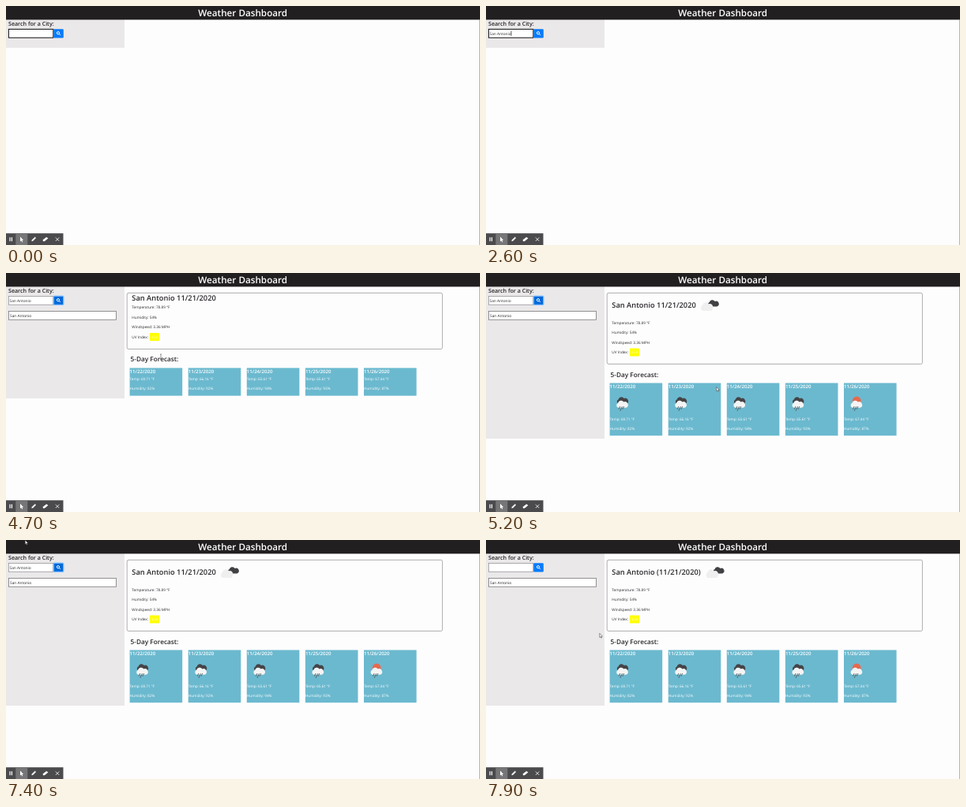
Recreate the animation shown at these times as an HTML page. Size 600x303 px, loop 8 s.

```html
<!DOCTYPE html>
<html lang="en">
<head>
<meta charset="utf-8">
<title>Weather Dashboard</title>
<style>
  html, body { margin: 0; width: 100%; height: 100%; overflow: hidden; background: #fefdfe; }
  svg { display: block; width: 100%; height: 100%; }
  text { font-family: "Open Sans", "Noto Sans", sans-serif; text-rendering: geometricPrecision; white-space: pre; }
  .head { font-weight: 600; }
</style>
</head>
<body>
<svg viewBox="0 0 600 303">
  <defs>
    <path id="cloud" d="M3.4 10A3.3 3.3 0 0 1 3.1 3.9 4.2 4.2 0 0 1 10.6 2.6 3.8 3.8 0 0 1 13.6 10Z"/>
    <g id="broken">
      <use href="#cloud" transform="translate(9.2 0) scale(.92 .88)" fill="#414043"/>
      <use href="#cloud" transform="translate(0 2.6) scale(1.03 1.18)" fill="#f0eff0"/>
    </g>
    <g id="rain">
      <use href="#cloud" transform="translate(0 4) scale(.98 .98)" fill="#f4f4f4"/>
      <g stroke="#55585c" stroke-width=".9" stroke-linecap="round">
        <path d="M5.6 12.4l-1.4 3M8.2 12.6l-2.3 5M10.4 12.4l-1.4 3"/>
      </g>
    </g>
    <path id="arrow" d="M0 0V5.2L1.2 4.2 2 6 2.8 5.6 2 3.9H3.6Z" fill="#fff" stroke="#333" stroke-width=".5"/>
    <path id="hand" d="M-.6 .2Q0-.6 .6 .2V2.2L3 2.8Q3.6 3 3.4 4L2.8 6.4H-.4L-2 3.8Q-1.6 3.2-.6 4Z" fill="#fff" stroke="#333" stroke-width=".5"/>
    <path id="beam" d="M-1 0H1M0 0V6M-1 6H1" fill="none" stroke="#555" stroke-width=".6"/>
  </defs>
  <rect width="600" height="303" fill="#fefdfe"/>
  <rect id="side" y="17" width="150" fill="#eae8e9"/>
  <rect width="600" height="17.4" fill="#221f20"/>
  <text class="head" x="299.7" y="12.6" font-size="11.7" fill="#fff" text-anchor="middle">Weather Dashboard</text>
  <path d="M599.6 17V303" stroke="#8b898a" stroke-width=".7"/>
  <text class="head" x="3" y="24.9" font-size="7.1" fill="#262427">Search for a City:</text>
  <rect id="field" x="3.4" y="29.4" width="56.4" height="10.8" fill="#fff"/>
  <text id="typed" x="4.5" y="36.7" font-size="4.8" fill="#2b2b2b"></text>
  <path id="caret" stroke="#111" stroke-width=".7"/>
  <rect id="button" x="60.2" y="29.2" width="12.6" height="11.2" rx="1.2"/>
  <g fill="none" stroke="#fff" stroke-width="1">
    <circle cx="66" cy="34.2" r="1.6"/><path d="M67.2 35.4l1.7 1.7"/>
  </g>
  <g id="page"></g>
  <g id="toolbar">
    <rect y="288.2" width="72.5" height="14.8" fill="#4b4a4c"/>
    <rect x="12.3" y="288.2" width="15" height="14.8" fill="#767577"/>
    <path d="M5 293.3v5M7.4 293.3v5" stroke="#fff" stroke-width="1.2"/>
    <path d="M18 292.6v6l1.4-1.2 1 2 .9-.5-1-1.9h1.8Z" fill="#fff"/>
    <path d="M32.6 298l.4-1.4 3.7-3.6 1.1 1.1-3.7 3.6Z" fill="#fff" stroke="#fff" stroke-width=".4"/>
    <path d="M46.6 296.6l4.6-3.6 2.2 1.4-4.5 3.8h-2Z" fill="#fff"/>
    <path d="M62.8 293.5l4.5 4.5M67.3 293.5l-4.5 4.5" stroke="#fff" stroke-width=".8"/>
  </g>
  <use id="cursor"/>
</svg>
<script>
const LOOP = 8000;
const $ = id => document.getElementById(id);
const set = (el, attrs) => { for (const k in attrs) el.setAttribute(k, attrs[k]); };

// [time, characters typed]
const typing = [[0, 0], [1200, 1], [1500, 2], [1600, 3], [1800, 4], [1900, 5], [2000, 6],
  [2100, 7], [2300, 8], [2400, 9], [2600, 11]];

// [time, x, y, shape]
const track = [[3500, 56, 46, 'arrow'], [3700, 68.8, 32, 'hand'], [4100, 68.8, 32, 'hand'],
  [4200, 78, 42, 'arrow'], [4700, 196, 103, 'beam'], [4800, 222, 113, 'arrow'],
  [5200, 291.7, 144.5, 'arrow'], [5300, 291.7, 144.5, 'arrow'], [5700, 108, 94, 'arrow'],
  [6000, 189, 105, 'arrow'], [6900, 8, 0, 'arrow'], [7400, 24.3, .2, 'arrow'],
  [7600, 25, .2, 'arrow'], [7800, 241, 11, 'arrow'], [7900, 143.8, 118.3, 'arrow']];

// Vertical positions while the results fill in
const empty = { side: 113.8, panel: 73.4, title: 35.2, rows: [, , , 60], five: 90, top: 97.6, bottom: 110.4 };
const bare = { side: 159, panel: 96.4, title: 35.2, rows: [45.4, 57.9, 70.3, 82.7], five: 112.1,
  top: 120.4, bottom: 155.6, cells: [126.7, 136, 148.4], data: true };
const full = { side: 210, panel: 115.4, title: 43.6, rows: [64.8, 77.3, 89.7, 102.2], five: 131.6,
  top: 139.5, bottom: 206.2, cells: [145.8, 186.7, 199.2], data: true, icons: true };
const reloaded = { ...full, parens: true };
const phases = [[0, null], [3700, empty], [4000, bare], [4900, full], [7600, reloaded]];

const days = [[22, '69.71', 82], [23, '66.16', 92], [24, '65.61', 94], [25, '65.61', 93], [26, '67.44', 87]];
const facts = ['Temperature: 78.89 °F', 'Humidity: 54%', 'Windspeed: 3.36 MPH', 'UV Index:'];

const last = (list, t) => list.filter(k => k[0] <= t).pop();
const text = (x, y, size, fill, str, cls = '') =>
  `<text class="${cls}" x="${x}" y="${y}" font-size="${size}" fill="${fill}">${str}</text>`;
const box = (x, y, w, h, rest) => `<rect x="${x}" y="${y}" width="${w}" height="${h}" ${rest}/>`;
const icon = (name, x, y) => `<use href="#${name}" x="${x}" y="${y}"/>`;

function card(p, [day, temp, humidity], i) {
  const x = 156.6 + 74.1 * i;
  let s = box(x, p.top, 66.6, p.bottom - p.top, 'fill="#6bb9cf"');
  if (!p.data) return s;
  const [a, b, c] = p.cells;
  s += text(x, a, 6.1, '#fff', `11/${day}/2020`, 'head')
    + text(x, b, 4.6, '#fff', `Temp: ${temp} °F`)
    + text(x, c, 4.7, '#fff', `Humidity: ${humidity}%`);
  if (p.icons) {
    s += i < 4
      ? `<use href="#cloud" transform="translate(${x + 8} 156.4) scale(.96)" fill="#454447"/>`
      : `<circle cx="${x + 16.2}" cy="162" r="5.4" fill="#e8694c"/>`;
    s += icon('rain', x + 7.4, 157);
  }
  return s;
}

function page(p) {
  if (!p) return '';
  const ink = '#2a282b';
  const date = p.parens ? '(11/21/2020)' : '11/21/2020';
  let s = box(153.2, 25.3, 399.2, p.panel - 25.3, 'rx="1.8" fill="#fefdfe" stroke="#9b999b" stroke-width=".8"')
    + text(159.3, p.title, 9.3, ink, 'San Antonio ' + date, 'head');
  facts.forEach((f, i) => { if (p.rows[i]) s += text(159.3, p.rows[i], 4.7, ink, f); });
  s += text(157.6, p.five, 8.25, ink, '5-Day Forecast:', 'head');
  if (p.data) {
    s += box(181.8, p.rows[3] - 6.6, 12.2, 9.9, 'rx=".8" fill="#ff0"')
      + text(183.4, p.rows[3], 4.6, '#fffbd0', '4.34')
      + box(3.4, 48.4, 136, 10.8, 'fill="#fff" stroke="#777" stroke-width=".8"')
      + text(5, 55.7, 4.8, ink, 'San Antonio');
  }
  if (p.icons) s += icon('broken', p.parens ? 277.5 : 270.8, 33.6);
  return s + days.map((d, i) => card(p, d, i)).join('');
}

function drawCursor(t) {
  const i = track.findLastIndex(k => k[0] <= t);
  set($('cursor'), { visibility: i < 0 ? 'hidden' : 'visible' });
  if (i < 0) return;
  const a = track[i], b = track[i + 1] || a;
  const f = b === a ? 0 : (t - a[0]) / (b[0] - a[0]);
  const x = a[1] + (b[1] - a[1]) * f, y = a[2] + (b[2] - a[2]) * f;
  set($('cursor'), { href: '#' + a[3], transform: `translate(${x} ${y})` });
}

let shown;
function draw(now) {
  const t = Math.floor(now % LOOP / 100) * 100;
  const phase = last(phases, t)[1];
  if (phase !== shown) {
    $('page').innerHTML = page(phase);
    shown = phase;
  }
  set($('side'), { height: (phase ? phase.side : 53) - 17 });

  const editing = t < 3700;
  const count = phase === reloaded ? 0 : last(typing, t)[1];
  const typed = $('typed');
  typed.textContent = 'San Antonio'.slice(0, count);
  set($('field'), { stroke: editing ? '#111' : '#8a888a', 'stroke-width': editing ? 1 : .7 });

  const caretOn = (t >= 200 && t < 600) || (t >= 1200 && t < 3200);
  const cx = 4.8 + (count ? typed.getComputedTextLength() : 0);
  set($('caret'), { d: `M${cx} 31.6V37.8`, visibility: caretOn ? 'visible' : 'hidden' });

  const pressed = !editing && phase !== reloaded;
  set($('button'), { fill: pressed ? '#0069d9' : '#087bfa',
    stroke: pressed ? '#80bdff' : 'none', 'stroke-width': 1.2 });
  drawCursor(t);
}

const start = performance.now();
function tick() {
  draw(performance.now() - start);
  requestAnimationFrame(tick);
}
tick();
</script>
</body>
</html>
```
